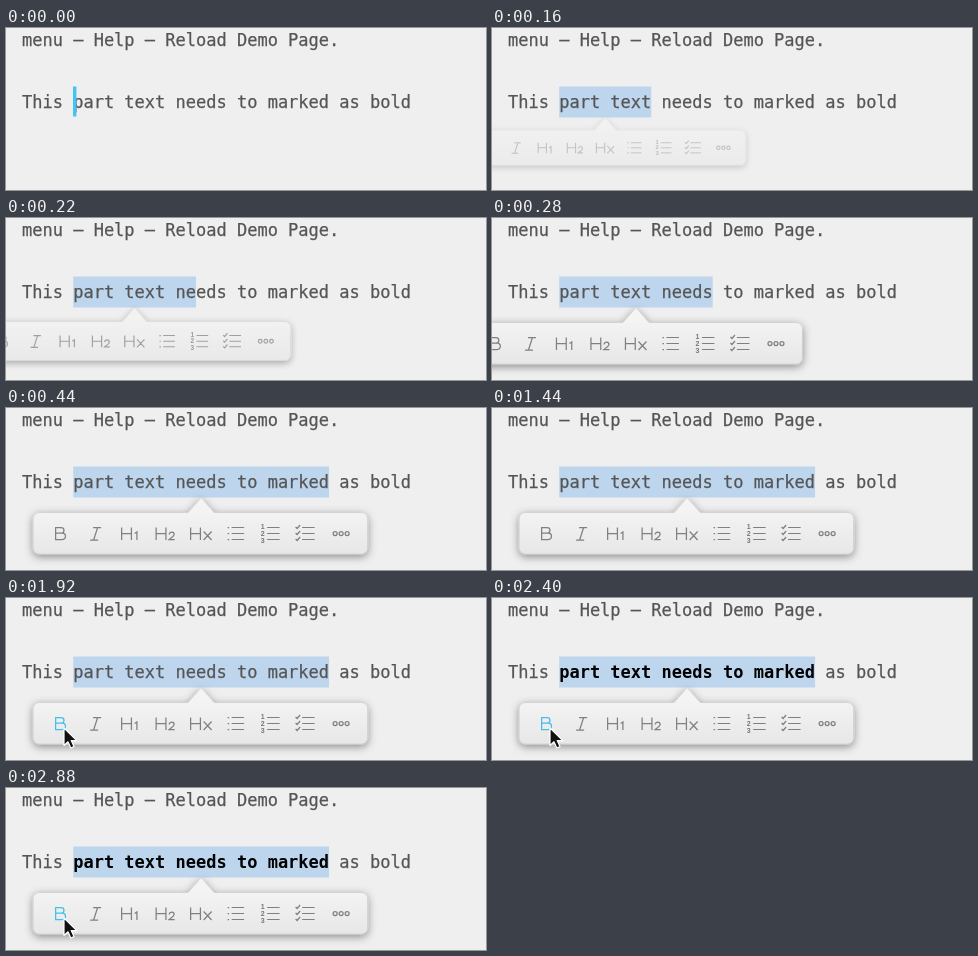
These frames come from a looping animation (480x162 px, 3.08 s). An HTML page:

```html
<!DOCTYPE html>
<html lang="en">
<head>
<meta charset="utf-8">
<title>Bold from the popover toolbar</title>
<style>
  html, body { margin: 0; height: 100%; overflow: hidden; background: #efefef; }
  svg { display: block; width: 100vw; height: 100vh; }
  text { white-space: pre; }
  .doc { font: 17px "DejaVu Sans Mono", monospace; fill: #555; stroke: #555; stroke-width: .25; }
  .box { fill: url(#face); stroke: #cbcbcb; stroke-width: .7; filter: url(#shadow); }
  .icons { fill: none; stroke: #808080; stroke-width: 1.25; }
  .num { font: bold 7px "Liberation Sans", sans-serif; fill: #777; stroke: none; }
</style>
</head>
<body>
<svg viewBox="0 0 480 162">
  <defs>
    <linearGradient id="face" x2="0" y2="1">
      <stop offset=".2" stop-color="#f4f4f4"/>
      <stop offset="1" stop-color="#e7e7e7"/>
    </linearGradient>
    <filter id="shadow" x="-10%" y="-30%" width="120%" height="170%">
      <feDropShadow dx="0" dy="2.5" stdDeviation="4" flood-opacity=".42"/>
    </filter>
  </defs>
  <rect id="sel" x="67.2" y="58.5" height="31" fill="#bdd6ee"/>
  <text class="doc" x="16" y="18">menu – Help – Reload Demo Page.</text>
  <text class="doc" x="16" y="80">This <tspan id="part">part text needs to marked</tspan> as bold</text>
  <rect id="caret" x="67" y="58.5" width="3.4" height="30" fill="#45c3f2"/>

  <g id="bar">
    <path class="box" d="M33 104.500H182L195 89.500L208 104.500H355.500a6 6 0 0 1 6 6V140a6 6 0 0 1-6 6H33a6 6 0 0 1-6-6V110.500a6 6 0 0 1 6-6Z"/>
    <g class="icons">
      <path id="bold" d="M49.500 119.500h5.500a2.800 2.800 0 0 1 0 5.700h-5.500zM49.500 125.200h6.700a3.100 3.100 0 0 1 0 6.300h-6.700z"/>
      <path d="M87 119.500h8M84 132h8M91.500 119.500L87.500 132"/>
      <path id="heads"/>
      <path d="M128.500 125.500l2.300-1.500v8M163 126.500c.5-3.300 5-3.300 5 0c0 1.800-3 3.200-5 5h5.500M197.500 123.500l8 8.500M205.500 123.500l-8 8.500"/>
      <path id="rows" stroke-width="1.1"/>
      <path d="M221.500 119.500h1.500M221.500 125.500h1.500M221.500 131.500h1.500"/>
      <text class="num" x="254.500" y="120.500">1</text>
      <text class="num" x="254.500" y="127.500">2</text>
      <text class="num" x="254.500" y="134.500">3</text>
      <path d="M289.500 119l1.500 1.500l3-3.500M289.500 125l1.500 1.500l3-3.500M289.500 131l1.500 1.500l3-3.500"/>
      <path d="M327 125.500a2 2 0 1 0 4 0a2 2 0 1 0-4 0M333 125.500a2 2 0 1 0 4 0a2 2 0 1 0-4 0M339 125.500a2 2 0 1 0 4 0a2 2 0 1 0-4 0"/>
    </g>
  </g>
  <path id="mouse" d="M0 0V17.500L4 13.800L6.800 20L10 18.600L7.200 12.600H12.800Z" fill="#111" stroke="#fff" stroke-width="1.2" stroke-linejoin="round"/>
</svg>
<script>
const LOOP = 3080, STEP = 20, CHAR = 10.234, LEFT = 67.2;
const $ = id => document.getElementById(id);
const [sel, part, caret, bar, bold, mouse] =
  ["sel", "part", "caret", "bar", "bold", "mouse"].map($);

$("heads").setAttribute("d", [115.5, 150, 184.5]
  .map(x => `M${x} 119.500v12.500m0-6.500h9.800m0-6v12.500`).join(""));
$("rows").setAttribute("d", [225.5, 261, 296]
  .map(x => [119.5, 125.5, 131.5].map(y => `M${x} ${y}h12.500`).join("")).join(""));

const ramp = (t, a, b) => Math.min(1, Math.max(0, (t - a) / (b - a)));
const ease = p => 1 - (1 - p) ** 2;

// Number of selected characters
const chars = t => Math.floor(
  9 * ramp(t, 20, 160) + 6 * ramp(t, 160, 280) + 10 * ramp(t, 280, 440) + 1e-6);

function draw(now) {
  const t = Math.floor(now % LOOP / STEP) * STEP;

  const width = chars(t) * CHAR;
  sel.setAttribute("width", width);
  caret.setAttribute("visibility", t < 20 ? "visible" : "hidden");

  const scale = 0.75 + 0.25 * ramp(t, 100, 260);
  bar.setAttribute("transform",
    `translate(${LEFT + width / 2} 89) scale(${scale}) translate(-195 -89)`);
  bar.setAttribute("opacity", 0.4 * ramp(t, 80, 160) + 0.6 * ramp(t, 160, 280));

  const move = ease(ramp(t, 1440, 1900));
  const x = 354 - 296 * move;
  const y = 163 - 33 * move;
  mouse.setAttribute("transform", `translate(${x} ${y})`);
  mouse.setAttribute("visibility", t > 1440 ? "visible" : "hidden");
  bold.style.stroke = x < 71 ? "#45bfe8" : "";

  const gray = Math.round(70 * (1 - ramp(t, 2060, 2200)));
  const isBold = t >= 2080;
  part.style.fontWeight = isBold ? "bold" : "";
  part.style.fill = isBold ? `rgb(${gray},${gray},${gray})` : "";
  part.style.stroke = isBold ? "none" : "";
}

let start;
function tick(now) {
  start ??= now;
  draw(now - start);
  requestAnimationFrame(tick);
}
draw(0);
requestAnimationFrame(tick);
</script>
</body>
</html>
```
